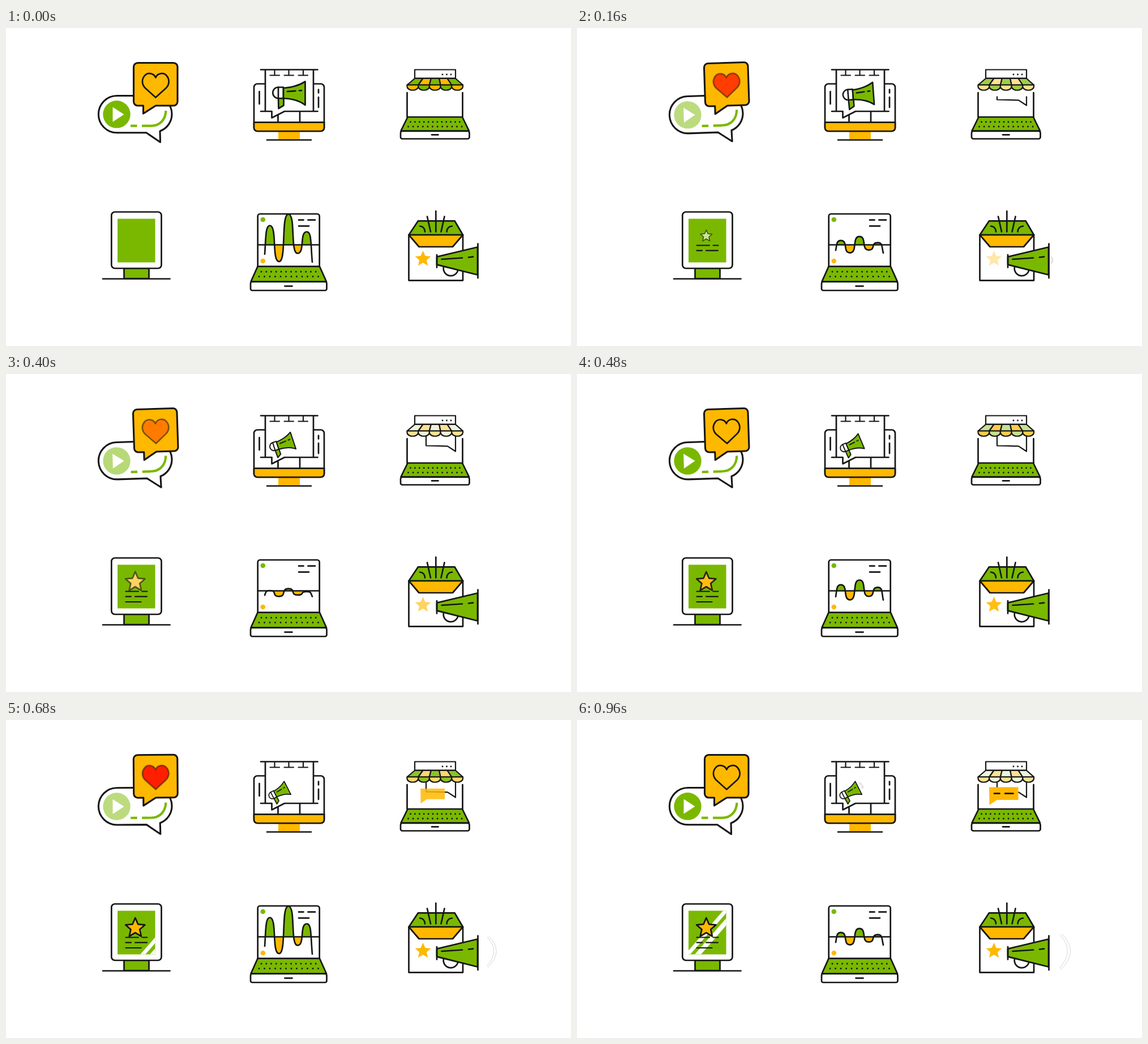
Recreate the animation shown at these times as an HTML page. Size 998 px wide and 561 px high, loop 1 s.

```html
<!DOCTYPE html>
<html lang="en">
<head>
<meta charset="utf-8">
<title>Marketing icons</title>
<style>
html, body { margin: 0; width: 100%; height: 100%; overflow: hidden; background: #fff; }
svg { display: block; width: 998px; height: 561px; }
.ink { fill: none; stroke: #161616; stroke-width: 2.7; stroke-linecap: round; stroke-linejoin: round; }
.bold { stroke-width: 3.1; }
.thin { stroke-width: 2.2; }
.w { fill: #fff; }
.g { fill: #7ab800; }
.y { fill: #ffb800; }
.dots { fill: none; stroke: #161616; stroke-width: 2.9; stroke-linecap: round; }
.wave { fill: none; stroke: #777; stroke-width: 1; }
.wave path, #curve { vector-effect: non-scaling-stroke; }
</style>
</head>
<body>
<svg viewBox="0 0 998 561">
  <defs>
    <clipPath id="panelClip"><path d="M197 336.5h66.5v77H197z"/></clipPath>
    <clipPath id="aboveClip"><path d="M446 326h106v56.5H446z"/></clipPath>
    <clipPath id="belowClip"><path d="M446 382.5h106V420H446z"/></clipPath>
    <clipPath id="frameClip"><rect id="frameBox" x="735" y="0" width="66" height="140"/></clipPath>
    <clipPath id="dashClip"><rect id="dashBox" x="734" y="124" width="0" height="12"/></clipPath>
  </defs>

  <!-- speech bubbles -->
  <g id="talk">
    <path class="ink bold w" d="M196 119.5H260C278 119.5 293 134 293 152C293 165 285 177 272 182L272.5 201.5 248 184.8H196A32.6 32.6 0 0 1 196 119.5Z"/>
    <circle id="play" class="g" cx="195.5" cy="152.3" r="24.2"/>
    <path class="w" d="M188.5 139.5L208.5 152.5 188.5 165.5Z"/>
    <path d="M220 172.7h11.5M240 172.7H256C272 172.5 281.5 162 282.5 146" fill="none" stroke="#7ab800" stroke-width="4.2"/>
  </g>
  <g id="like">
    <path class="ink bold y" d="M232.5 61.5H296a7 7 0 0 1 7 7V130a7 7 0 0 1-7 7H264.5L242.5 151V137H232.5a7 7 0 0 1-7-7V68.5a7 7 0 0 1 7-7Z"/>
    <path id="heart" class="ink" d="M264.3 87.5C261 79 250 78 245 84C239 91 240 100 246 106L264.3 122.5 282.6 106C288.6 100 289.6 91 283.6 84C278.6 78 267.6 79 264.3 87.5Z"/>
  </g>

  <!-- monitor with billboard -->
  <g>
    <path class="y" d="M481 182h38v14.5h-38z"/>
    <rect class="ink w" x="438" y="98.5" width="124" height="83.5" rx="6"/>
    <path class="ink y" d="M438 166.3H562V176a6 6 0 0 1-6 6H444a6 6 0 0 1-6-6Z"/>
    <path class="ink" d="M461 197.5H539M480.5 148V166M519 148V166M447.5 112V134M552 108.5V114.5M552 122V140"/>
    <path class="w" d="M458 73.5H543V147H492L469.5 158.5V147H458Z"/>
    <path class="ink" d="M450 73.5H550.5M458 73.5V147M543 73.5V147M450 147H469.5V158.5L492 147H550.5"/>
    <path class="ink thin" d="M474.5 74v9M499.5 74v9M525 74v9M466.5 83.5h16.5M491.5 83.5h16.5M516.5 83.5h16.5"/>
    <g id="horn">
      <path class="ink g" d="M481 124H490.5V136.5L481.5 142Z"/>
      <path class="ink w" d="M490 104.5H481a9.7 9.7 0 0 0 0 19.5H490Z"/>
      <path class="ink" d="M481 104.5V124"/>
      <path class="ink g" d="M490 106C506 105 518 101 528.5 94.5V136C518 128 506 124.5 490 124Z"/>
      <path class="ink" d="M497 112L511.5 111M518 110.5L522 110.2"/>
    </g>
    <g id="ping" class="wave"><path d="M497 110Q503 114 504 121M500 110Q505 114 506 120"/></g>
  </g>

  <!-- shop laptop -->
  <g>
    <g clip-path="url(#frameClip)"><path class="ink thin" d="M742 100V126.5L780 127.3 794 136.5V100"/></g>
    <g id="note">
      <path class="y" d="M728 118.5H779.5V141H741.5L728.5 150Z"/>
      <g clip-path="url(#dashClip)"><path class="ink" d="M737 129.7h9.5M756 129.7h14.5"/></g>
    </g>
    <g id="awning"></g>
    <path class="ink thin w" d="M722 73.5H794V88.7H722Z"/>
    <path class="dots" d="M771 82h16" stroke-dasharray="0 7.5"/>
    <path class="ink" d="M708.5 114V157M806.5 114V157"/>
    <path class="ink g" d="M709.5 157H806L818 181.5H697.5Z"/>
    <path class="dots" d="M714.5 165.7H802" stroke-dasharray="0 7.9"/>
    <path class="dots" d="M710.5 174H806" stroke-dasharray="0 8.6"/>
    <rect class="ink w" x="697" y="181.8" width="121.5" height="13.7" rx="3"/>
    <path class="ink" d="M752 188.3h11.5"/>
  </g>

  <!-- poster stand -->
  <g>
    <path class="ink g" d="M208.5 424H252.5V442H208.5Z"/>
    <path class="ink" d="M171 442.5H289.5"/>
    <rect class="ink w" x="186.3" y="324.5" width="88.2" height="99.5" rx="6"/>
    <path class="g" d="M197 336.5h66.5v77H197z"/>
    <g clip-path="url(#panelClip)"><path id="shine" class="w" d="M0 413.5H9L96 313.5H87ZM17 413.5H28L115 313.5H104Z"/></g>
    <path id="star" class="ink"/>
    <path class="ink thin row" d="M211.5 383.5H234M240.5 383.5H249.5"/>
    <path class="ink thin row" d="M211.5 392.6H221M228 392.6H249"/>
    <path class="ink thin row" d="M211.5 402H238.5"/>
  </g>

  <!-- chart laptop -->
  <g>
    <rect class="ink w" x="444.7" y="328" width="109" height="97" rx="4"/>
    <g clip-path="url(#aboveClip)"><path id="hills" class="g"/></g>
    <g clip-path="url(#belowClip)"><path id="dips" class="y"/></g>
    <path class="ink" d="M445 382.5H553.5"/>
    <path id="curve" class="ink"/>
    <circle class="g" cx="453.8" cy="338" r="4.3"/>
    <circle class="y" cx="453.8" cy="411" r="4.3"/>
    <path class="ink" d="M517 338.7h8.5M533.5 338.7h12.5M517 349.3h18"/>
    <path class="ink g" d="M444.5 420.7H554L566 447.5H432.5Z"/>
    <path class="dots" d="M451 430H550" stroke-dasharray="0 8.75"/>
    <path class="dots" d="M447 438.5H554" stroke-dasharray="0 9.5"/>
    <rect class="ink w" x="432" y="447.7" width="134.5" height="15.3" rx="3"/>
    <path class="ink" d="M492.5 455.3h13"/>
  </g>

  <!-- box with horn -->
  <g>
    <path class="ink w" d="M711.5 365H807V445.3H711.5Z"/>
    <path class="ink g" d="M728 340.3H792.5L807 365H711.5Z"/>
    <path class="ink y" d="M711.5 365H807L789 386H729.5Z"/>
    <path class="ink" d="M759.3 323V359.5M744 332.5L750 359.5M774.5 332.5L768.5 359.5M731 349.5Q739.5 350 740 359.5M788 349.5Q779 350 778.5 359.5"/>
    <path id="badge" class="y"/>
    <path class="ink w" d="M773 421.5A12.7 12.7 0 0 0 798.3 427"/>
    <path class="ink g" d="M761 403.5L833 386.5V435.5L761 417.5Z"/>
    <path class="ink" d="M761 400V422.5M833.5 380.5V441M769.5 408L806 405.5M817 404.5L825 403.7"/>
    <g id="sound" class="wave"><path d="M853 379Q880 408 852 438"/><path d="M856 377Q888 408 854 441"/></g>
  </g>
</svg>
<script>
const $ = id => document.getElementById(id);
const set = (el, name, value) => el.setAttribute(name, value);
const LOOP = 1000, STEP = 40;

// Timing rules
const ramp = (t, a, b) => Math.min(1, Math.max(0, (t - a) / (b - a)));
const smooth = x => x * x * (3 - 2 * x);
const tri = (t, period) => 1 - Math.abs(1 - 2 * ((t / period) % 1));
const scaleAt = (x, y, s) => `translate(${x} ${y}) scale(${s}) translate(${-x} ${-y})`;

function starPath(cx, cy, r) {
  const points = [];
  for (let i = 0; i < 10; i++) {
    const a = (i * 36 - 90) * Math.PI / 180, q = i % 2 ? r * 0.46 : r;
    points.push([cx + q * Math.cos(a), cy + q * Math.sin(a)]);
  }
  return "M" + points.join("L") + "Z";
}
set($("star"), "d", starPath(228.3, 367, 18));
set($("badge"), "d", starPath(736.5, 407.4, 14.6));

// Chart: extremes joined by steep curves with flat tangents
const extremes = [[466, 348.5], [482.3, 412], [498.8, 328.5], [515, 397.5], [531.3, 359.5]];
let wave = "";
for (let i = 1; i < extremes.length; i++) {
  const [x0, y0] = extremes[i - 1], [x, y] = extremes[i], h = (x - x0) * 0.82;
  wave += `C${x0 + h} ${y0} ${x - h} ${y} ${x} ${y}`;
}
const full = "M457 399C459 372 458 348.5 466 348.5" + wave + "C540 359.5 538 380 541 413";
set($("curve"), "d", full);
set($("hills"), "d", full + "V900H457Z");
set($("dips"), "d", "M466 348.5" + wave + "V200H466Z");

// Awning: five stripes, each with a scallop of the other colour
const cloth = { g: [], y: [] };
function addCloth(d, colour) {
  for (const c of ["w", colour, "ink thin"]) {
    const p = document.createElementNS("http://www.w3.org/2000/svg", "path");
    set(p, "d", d);
    set(p, "class", c);
    if (c === colour) cloth[c].push(p);
    $("awning").append(p);
  }
}
for (let i = 0; i < 5; i++) {
  const top = 722 + i * 14.4, low = 708.5 + i * 19.7, end = low + 19.7;
  const [stripe, scallop] = i % 2 ? "yg" : "gy";
  addCloth(`M${top} 89H${top + 14.4}L${end} 100.5H${low}Z`, stripe);
  addCloth(`M${low} 100.5H${end}V103C${end} 112 ${low} 112 ${low} 103Z`, scallop);
}
const fade = (list, o) => list.forEach(p => set(p, "opacity", o));

const rows = document.querySelectorAll(".row");

function drawBubbles(t) {
  const tilt = t < 40 || t > 880 ? 0 : -0.4 - 2.1 * Math.sin((t - 40) * Math.PI / 160);
  set($("talk"), "transform", `rotate(${tilt} 228 152)`);
  set($("like"), "transform", `rotate(${tilt} 264 100)`);
  const heat = tri(t, 480), ghost = Math.max(0.5, 1 - 1.4 * heat);
  $("heart").style.fill = `rgb(255,${184 * (1 - heat)},0)`;
  $("heart").style.strokeOpacity = ghost;
  set($("play"), "opacity", ghost);
}

function drawBillboard(t) {
  const p = smooth(ramp(t, 0, 640));
  set($("horn"), "transform",
    `translate(${529 - 31.5 * p} ${115 + 4.5 * p * p}) rotate(${-27 * p}) scale(${1 - 0.37 * p}) translate(-529 -115)`);
  set($("ping"), "opacity", 0.4 * ramp(t, 860, 960));
}

function drawShop(t) {
  fade(cloth.y, 1 - tri(t, 560));
  fade(cloth.g, 1 - tri(Math.max(0, t - 80), 560));
  set($("frameBox"), "y", 139 - 31 * ramp(t, 40, 240));
  const grow = ramp(t, 480, 720);
  set($("note"), "transform", scaleAt(753, 133, grow));
  set($("note"), "opacity", grow);
  set($("dashBox"), "width", 40 * ramp(t, 740, 960));
}

function drawPoster(t) {
  const grow = ramp(t, 40, 240), gold = ramp(t, 240, 500);
  set($("star"), "transform", scaleAt(228.3, 367, grow));
  set($("star"), "opacity", grow);
  $("star").style.fill = `rgb(255,${255 - 71 * gold},${255 * (1 - gold)})`;
  $("star").style.strokeOpacity = 1 - 0.4 * Math.sin(Math.PI * gold);
  rows.forEach((row, i) => set(row, "opacity", ramp(t, 40 + 60 * i, 100 + 60 * i)));
  set($("shine"), "transform", `translate(${257 - 0.165 * (t - 560)} 0)`);
}

function drawChart(t) {
  const u = t % 800, level = Math.max(1 - ramp(u, 0, 320), ramp(u, 320, 600));
  const amp = 0.05 + 0.95 * level ** 1.7;
  for (const id of ["curve", "hills", "dips"])
    set($(id), "transform", `translate(0 ${388.5 * (1 - amp)}) scale(1 ${amp})`);
}

function drawBox(t) {
  set($("badge"), "opacity", Math.max(1 - ramp(t, 0, 240), ramp(t, 240, 500)));
  const late = t >= 480;
  const spread = late ? 1 - (1 - ramp(t, 480, 800)) ** 2 : 0.4 * ramp(t, 0, 320);
  const shade = late ? 0.3 * ramp(t, 480, 640) : 0.4 * Math.sin(Math.PI * ramp(t, 40, 400));
  set($("sound"), "transform", scaleAt(833, 410, spread));
  set($("sound"), "opacity", shade);
}

const parts = [drawBubbles, drawBillboard, drawShop, drawPoster, drawChart, drawBox];
const start = performance.now();
function tick() {
  const t = (performance.now() - start) % LOOP;
  parts.forEach(draw => draw(Math.floor(t / STEP) * STEP));
  requestAnimationFrame(tick);
}
tick();
</script>
</body>
</html>
```
